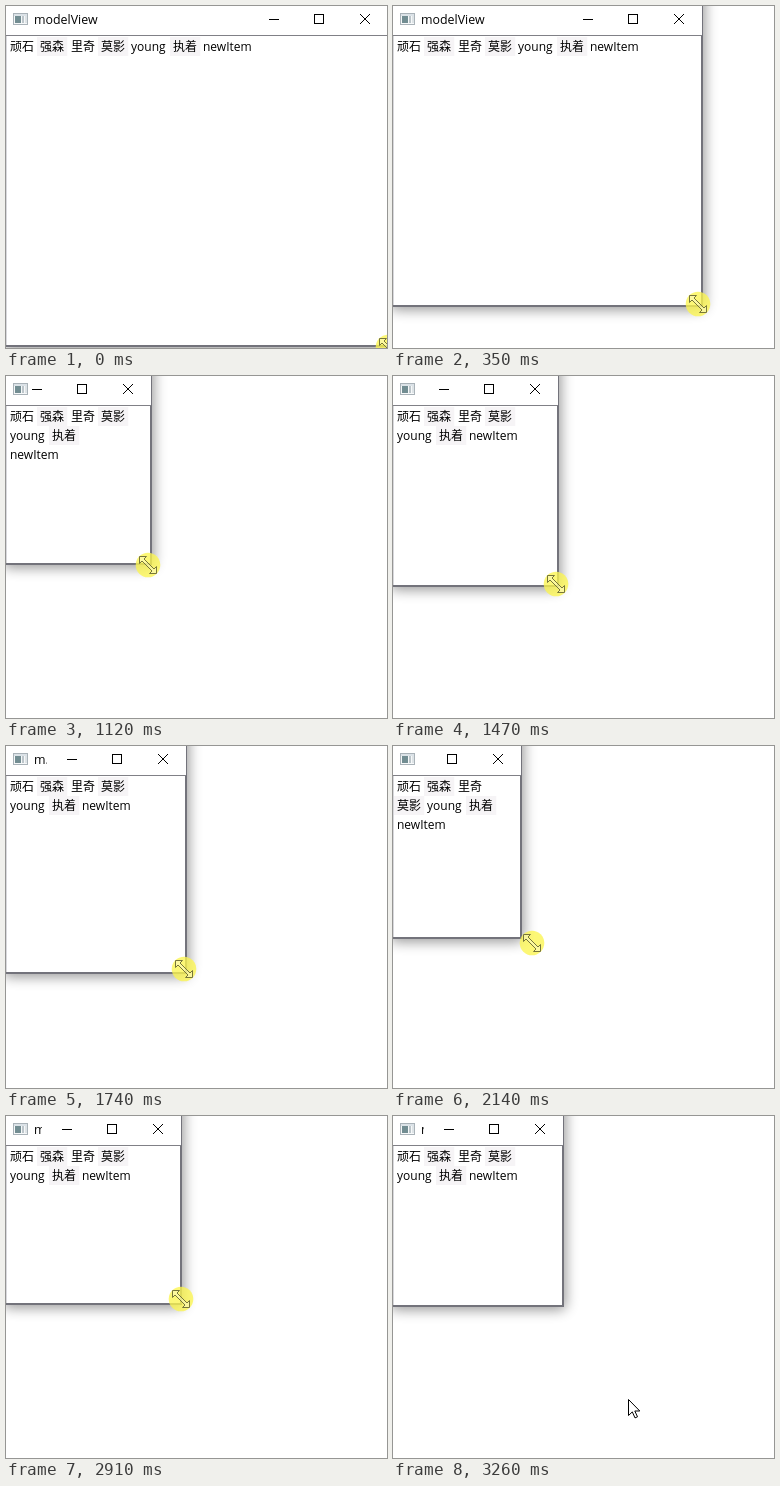
Recreate the animation shown at these times as an HTML page. Size 381x342 px, loop 3330 ms.

```html
<!DOCTYPE html>
<html lang="zh-CN">
<head>
<meta charset="utf-8">
<title>modelView</title>
<style>
  html, body { margin: 0; width: 100%; height: 100%; overflow: hidden; background: #fff; }
  svg { display: block; }
  text { font: 12px "Open Sans", "Noto Sans CJK SC", "Noto Sans CJK", sans-serif; fill: #000; }
  #title { font-size: 12.4px; }
  .line { fill: none; stroke: #000; }
</style>
</head>
<body>
<svg width="381" height="342" viewBox="0 0 381 342">
  <defs>
    <filter id="blur" x="-20%" y="-20%" width="140%" height="140%">
      <feGaussianBlur stdDeviation="6.5"/>
    </filter>
    <clipPath id="titleClip"><rect id="titleBox" x="28" width="0" height="28"/></clipPath>
  </defs>

  <rect id="shadow" x="-3" y="-15" rx="6" fill="#000" opacity=".4" filter="url(#blur)"/>
  <rect id="border" y="-2" fill="#73737b"/>
  <rect id="face" y="30" fill="#fff"/>
  <rect id="titleBar" height="29" fill="#fff"/>
  <rect id="rule" y="29" height="1" fill="#808086"/>
  <rect id="leftEdge" y="30" width="1" fill="#d8d8dc"/>

  <g clip-path="url(#titleClip)"><text id="title" x="28" y="18"></text></g>
  <g id="buttons" class="line">
    <path d="M-119 13.5h10"/>
    <rect x="-73.5" y="8.5" width="9" height="9"/>
    <path d="M-28 8l10 10M-18 8l-10 10"/>
  </g>
  <g id="icon">
    <rect x="7.5" y="7.5" width="14" height="11" fill="#f6f8f9" stroke="#a9b2b8"/>
    <rect x="8" y="8" width="13" height="2" fill="#dbe2e7"/>
    <rect x="9" y="10" width="6" height="7" fill="#728d92"/>
    <rect x="16" y="10" width="2" height="7" fill="#bcc5ca"/>
    <rect x="19" y="10" width="2" height="7" fill="#dde3e6"/>
  </g>
  <g id="items"></g>

  <g id="resize">
    <circle r="12.3" fill="#fbf550" opacity=".78"/>
    <path d="M-8.5-8.5h7L-4-6L6 4L8.5 1.5v7h-7L4 6L-6-4L-8.5-1.5z"
          fill="#fff" fill-opacity=".3" stroke="#77763a"/>
  </g>
  <path id="arrow" d="M.5.5v16l3.8-3.6l2.7 6l2.5-1.1l-2.7-5.8h5z" fill="#fff" stroke="#000"/>
</svg>

<script>
const LOOP = 3330, FRAMES = 48;
const RELEASE = 3050, MIN_WIDTH = 127;
const CJK = 30.25, ROW = 19, SCROLLBAR = 19;
const TITLE = "modelView";

// Each key: time, x, y
const corner = [[0, 382, 340], [560, 266, 284], [700, 240, 281], [1120, 145, 188],
  [1740, 180, 227], [2140, 127, 191], [2350, 165, 219], [2630, 237, 166],
  [2980, 170, 190], [LOOP, 170, 190]];
const pointer = [[0, 382, 341], [560, 261, 280], [700, 235, 275], [1120, 142, 189],
  [1740, 178, 223], [2140, 139, 196], [2350, 165, 219], [2630, 236, 165],
  [2980, 170, 190], [3260, 235, 283], [LOOP, 235, 283]];
const labels = [["顽石", CJK], ["强森", CJK], ["里奇", CJK], ["莫影", CJK],
  ["young", 42], ["执着", CJK], ["newItem", 55]];

const $ = id => document.getElementById(id);
const apply = (node, attrs) => {
  for (const name in attrs) node.setAttribute(name, attrs[name]);
};
const set = (id, attrs) => apply($(id), attrs);
const add = (tag, attrs) => {
  const node = document.createElementNS("http://www.w3.org/2000/svg", tag);
  apply(node, attrs);
  $("items").append(node);
  return node;
};

// Every other item has a tinted background
const items = labels.map(([label, width], i) => {
  const back = add("rect", { width, height: ROW, fill: i % 2 ? "#f6f4f6" : "none" });
  const text = add("text", {});
  text.textContent = label;
  return { back, text, width };
});

// Monotone cubic through the keys, at rest where the direction turns
function sample(keys, t, axis) {
  const rate = i => keys[i + 1] && keys[i]
    ? (keys[i + 1][axis] - keys[i][axis]) / (keys[i + 1][0] - keys[i][0]) : 0;
  const slope = i => {
    if (i === 0) return rate(0);
    const a = rate(i - 1), b = rate(i);
    return a * b > 0 ? 2 * a * b / (a + b) : 0;
  };
  let i = 0;
  while (i < keys.length - 2 && t >= keys[i + 1][0]) i++;
  const [from, to] = [keys[i], keys[i + 1]];
  const span = to[0] - from[0], u = (t - from[0]) / span, v = 1 - u;
  return from[axis] * v * v * (1 + 2 * u) + to[axis] * u * u * (3 - 2 * u)
    + span * u * v * (slope(i) * v - slope(i + 1) * u);
}
const at = (keys, t) => [1, 2].map(axis => Math.round(sample(keys, t, axis)));

function layoutItems(width) {
  let x = 0, row = 0;
  for (const { back, text, width: itemWidth } of items) {
    if (x && x + itemWidth > width - SCROLLBAR) { x = 0; row++; }
    const left = Math.round(x + 1), top = 31 + row * ROW;
    apply(back, { x: left, y: top });
    apply(text, { x: left + 3, y: top + 14 });
    x += itemWidth;
  }
}

function layoutTitle(width) {
  const room = Math.max(0, width - 167);
  const title = $("title");
  title.textContent = TITLE;
  for (let n = TITLE.length - 1; n > 0 && title.getComputedTextLength() > room; n--)
    title.textContent = TITLE.slice(0, n) + "...";
  set("titleBox", { width: room });
}

function drawWindow(w, h) {
  set("shadow", { width: w + 6, height: h + 19 });
  set("border", { width: w + 1, height: h + 3 });
  set("face", { width: w - 1, height: h - 31 });
  set("titleBar", { width: w });
  set("rule", { width: w });
  set("leftEdge", { height: h - 31 });
  set("buttons", { transform: `translate(${w} 0)` });
  layoutTitle(w);
  layoutItems(w);
}

function render(time) {
  const step = Math.floor((time % LOOP + 11) * FRAMES / LOOP) % FRAMES;
  const t = Math.ceil(step * LOOP / FRAMES / 10) * 10;
  const [w, h] = at(corner, t);
  const [x, y] = at(pointer, t);
  const free = t > RELEASE;
  drawWindow(Math.max(MIN_WIDTH, w), h);
  set("resize", { transform: `translate(${x} ${y})`, visibility: free ? "hidden" : "visible" });
  set("arrow", { transform: `translate(${x} ${y})`, visibility: free ? "visible" : "hidden" });
}

const start = performance.now();
function tick() {
  render(performance.now() - start);
  requestAnimationFrame(tick);
}
tick();
</script>
</body>
</html>
```
